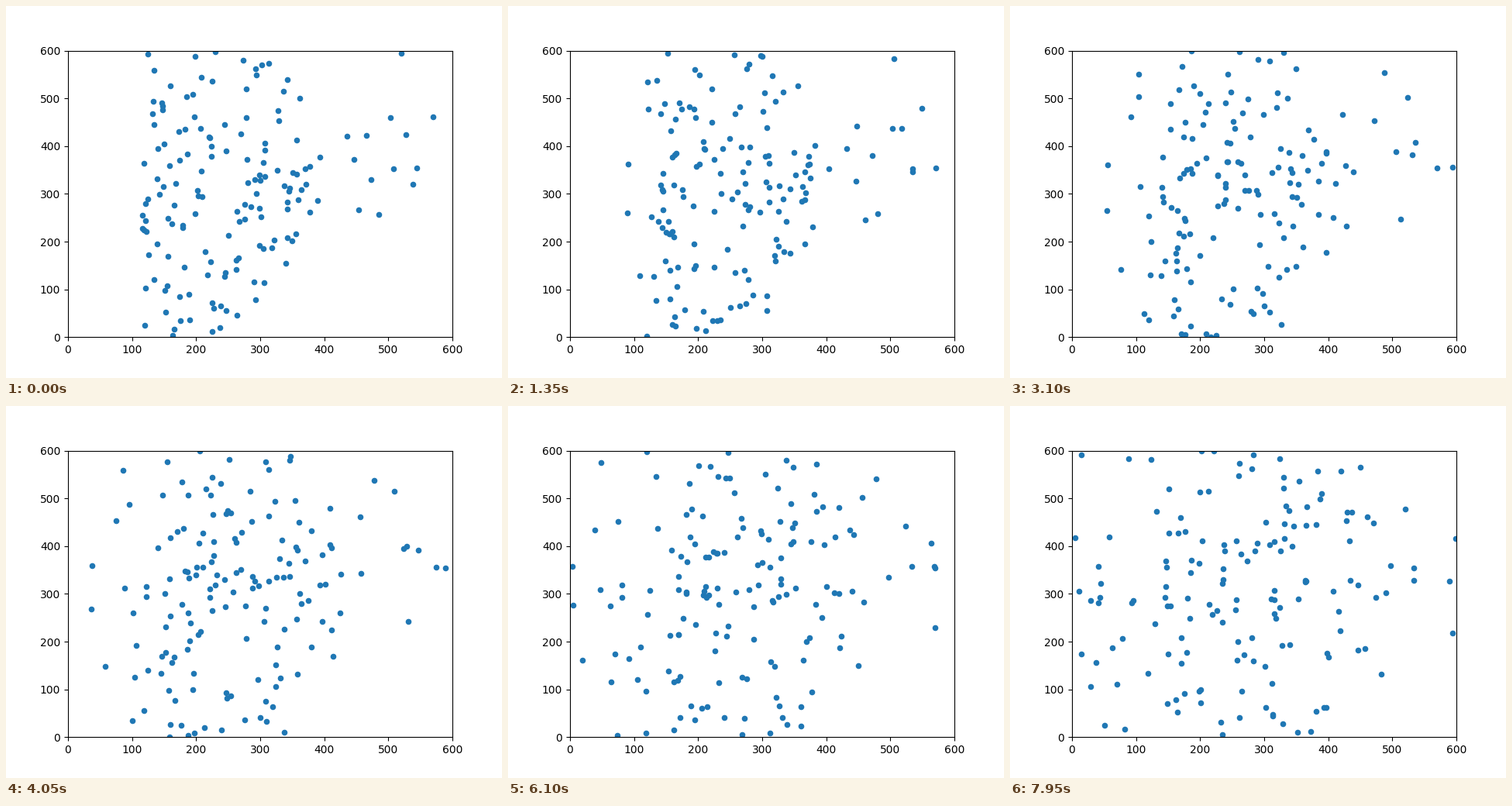
A matplotlib script that plays this animation: 640 px wide and 480 px high, repeating every 8000 ms.

```python
import numpy as np
import matplotlib.pyplot as plt
from matplotlib.animation import FuncAnimation

SIZE = 600      # side of the box
FRAMES = 160
INTERVAL = 50   # ms
CROWD = 142     # particles in the main swarm

# Stragglers in the sparse right part: x, y, heading in degrees
STRAGGLERS = [
    (520, 594, 121.6), (570, 461, 138.8), (508, 353, 0.4), (544, 354, 1.8),
    (538, 320, 96.5), (527, 424, 152), (503, 460, 302.6), (466, 422, 134.5),
    (435, 421, 263.1), (446, 372, 16), (473, 330, 188.3), (454, 266, 342.4),
    (485, 257, 203.8),
]


def make_crowd(rng):
    """Fill a band that bulges to the right, densest around half height."""
    rank = (np.arange(CROWD) + rng.random(CROWD)) / CROWD
    y = SIZE * (rank + 0.4 * np.sin(2 * np.pi * rank) / (2 * np.pi))
    left = 110
    right = 410 - 180 * ((y - 370) / 370) ** 2
    x = left + (right - left) * rng.random(CROWD)
    return np.column_stack([x, y, rng.uniform(0, 360, CROWD)])


particles = np.vstack([STRAGGLERS, make_crowd(np.random.default_rng(7))])
start = particles[:, :2]
heading = np.radians(particles[:, 2])
velocity = np.column_stack([np.cos(heading), np.sin(heading)])


def positions(step):
    """Straight unit-speed paths folded back at the walls."""
    free = start + velocity * step
    return SIZE - np.abs(SIZE - free % (2 * SIZE))


fig, ax = plt.subplots(figsize=(6.4, 4.8), dpi=100)
ax.set_xlim(0, SIZE)
ax.set_ylim(0, SIZE)
dots = ax.scatter(start[:, 0], start[:, 1], s=20, color="C0")


def update(step):
    dots.set_offsets(positions(step))
    return dots,


anim = FuncAnimation(fig, update, frames=FRAMES, interval=INTERVAL,
                     repeat=True, repeat_delay=0)
plt.show()
```
